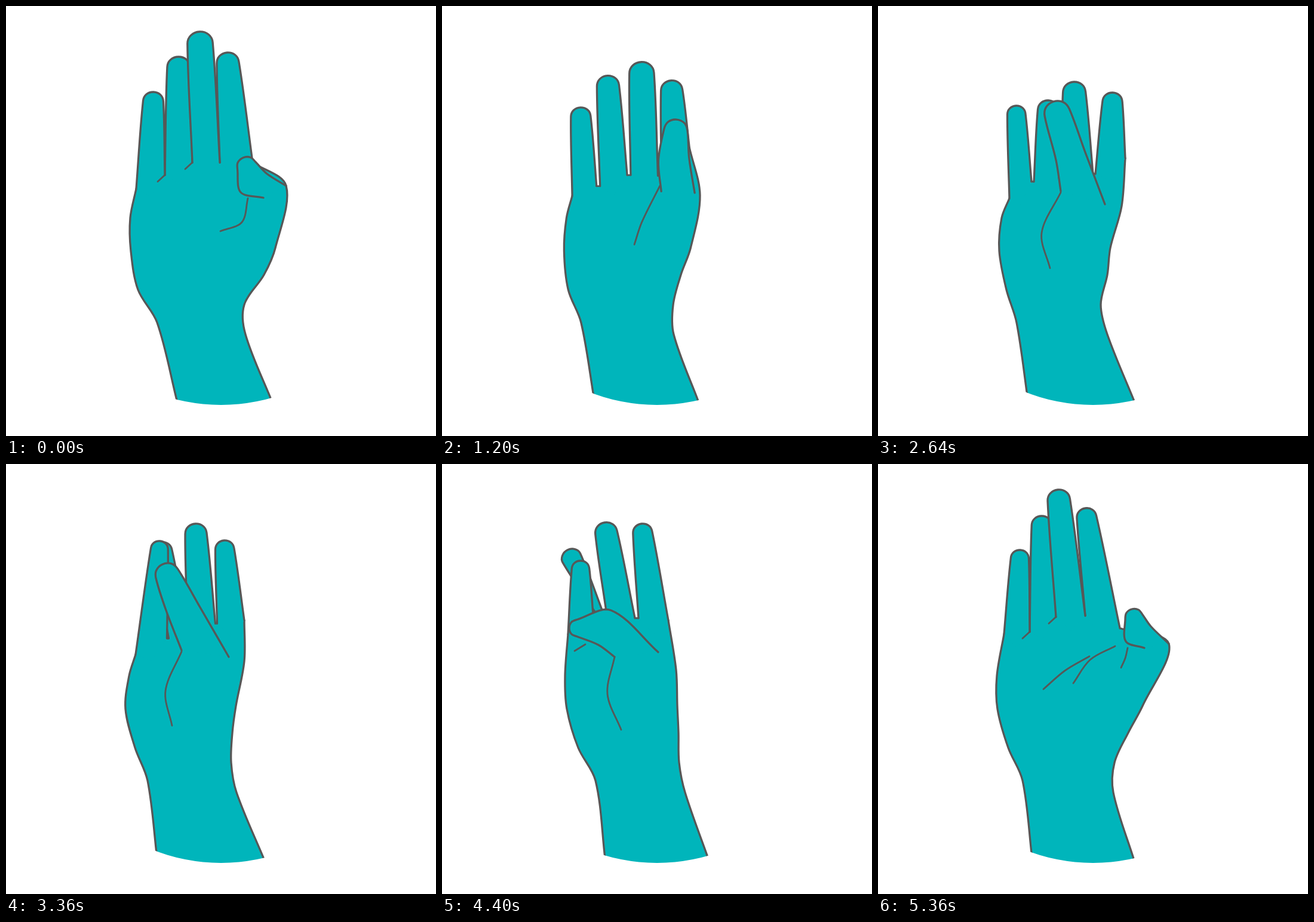
These frames come from a looping animation (720x720 px, 5.44 s). An HTML page with a canvas:

```html
<!DOCTYPE html>
<html lang="en">
<head>
<meta charset="utf-8">
<title>Thumb to finger exercise</title>
<style>
html, body { margin: 0; width: 100%; height: 100%; overflow: hidden; background: #fff; }
canvas { display: block; }
</style>
</head>
<body>
<canvas id="stage" width="720" height="720"></canvas>
<script>
const ctx = document.getElementById('stage').getContext('2d');
const LOOP = 5440, STEP = 80;
const SKIN = '#00b5bb', INK = '#575757';
const WIDTHS = [32, 36, 40, 35];          // pinky, ring, middle, index
const LEFT_Y = [660, 530, 475, 410, 355]; // heights at which the palm edges are given
const RIGHT_Y = [405, 450, 500, 550, 664];

const points = text => text.split(' ').map(p => p.split(',').map(Number));

// webs: the five points between and beside the fingers; knuckle: top of the right palm edge;
// thumb: inner base, inner joint, tip, outer joint, outer base
const pose = (at, size, gap, left, right, webs, tips, knuckle, thumbSize, thumb, crease) => ({
  at, size, gap, left, right, thumbSize, webs: points(webs), tips: points(tips),
  knuckle: points(knuckle)[0], thumb: points(thumb), crease: points(crease)
});

const POSES = [
  pose(0, 1.06, 0, [286, 253, 221, 209, 208], [451, 432, 399, 401, 446],
    '218,306 266,283 312,262 358,262 413,262', '247,144 289,85 324,43 370,78',
    '469,301', 33, '431,321 393,312 397,254 437,281 469,301', '405,322 395,362 359,377'),
  pose(640, 1.06, 2, [255, 231, 209, 203, 207], [428, 407, 388, 388, 430],
    '219,318 265,297 313,277 364,279 412,205', '240,161 290,105 332,69 381,114',
    '446,284', 30, '397,282 389,250 421,205 438,245 446,284', '397,282 378,333 344,348'),
  pose(1840, 1, 4, [255, 235, 214, 206, 210], [403, 392, 386, 388, 430],
    '217,318 258,307 313,290 365,290 417,275', '222,180 262,130 336,122 387,137',
    '416,355', 50, '333,343 332,270 360,173 386,265 397,346', '328,323 285,395 297,458'),
  pose(2640, 0.95, 2, [251, 232, 215, 203, 207], [389, 384, 373, 384, 430],
    '220,322 259,294 305,288 362,281 414,255', '231,167 285,158 328,127 393,145',
    '408,335', 43, '306,310 298,258 294,160 347,245 380,332', '306,312 274,380 288,439'),
  pose(3360, 0.9, 1.5, [253, 237, 216, 200, 206], [385, 379, 377, 386, 433],
    '217,319 271,292 302,262 352,267 399,262', '258,129 259,131 317,100 365,128',
    '399,330', 40, '294,312 268,245 262,168 325,240 373,323', '294,314 267,380 278,438'),
  pose(4400, 0.92, 3, [273, 257, 228, 209, 206], [394, 396, 397, 407, 447],
    '211,285 256,252 272,247 326,258 379,262', '232,162 210,144 272,98 334,100',
    '392,345', 28, '289,323 262,303 213,275 283,245 362,315', '289,323 277,385 300,445'),
  pose(5360, 0.94, 0, [258, 242, 218, 200, 199], [443, 419, 396, 394, 429],
    '211,285 254,281 298,256 347,254 405,275', '238,144 274,87 301,43 347,74',
    '487,301', 30, '446,308 415,297 425,243 457,272 487,301', '397,305 355,328 327,367')
];

// Short skin lines: [from, to, points]
const MARKS = [
  [4160, 4720, points('222,313 240,302')],
  [5120, LOOP, points('354,322 313,346 277,377')],
  [5120, LOOP, points('418,308 414,325 407,341')]
];

function mix(a, b, f) {
  if (typeof a === 'number') return a + (b - a) * f;
  if (Array.isArray(a)) return a.map((v, i) => mix(v, b[i], f));
  return Object.fromEntries(Object.keys(a).map(k => [k, mix(a[k], b[k], f)]));
}

function poseAt(t) {
  const next = Math.max(1, POSES.findIndex(p => p.at >= t));
  const a = POSES[next - 1], b = POSES[next];
  const f = (t - a.at) / (b.at - a.at);
  const hand = mix(a, b, f);
  // The pinky swings out as the hand opens again
  if (next === POSES.length - 1) hand.tips[0][0] -= 88 * Math.sin(Math.PI * f);
  return hand;
}

const dist = (a, b) => Math.hypot(b[0] - a[0], b[1] - a[1]);
const middle = (a, b) => mix(a, b, 0.5);

// Smooth curve through the points, with handles in proportion to each segment
function curve(path, pts) {
  const dir = pts.map((p, i) => {
    const a = pts[i - 1] || p, b = pts[i + 1] || p;
    const len = dist(a, p) + dist(p, b) || 1;
    return [(b[0] - a[0]) / len, (b[1] - a[1]) / len];
  });
  path.lineTo(...pts[0]);
  for (let i = 1; i < pts.length; i++) {
    const a = pts[i - 1], b = pts[i], h = dist(a, b) / 3;
    path.bezierCurveTo(a[0] + dir[i - 1][0] * h, a[1] + dir[i - 1][1] * h,
      b[0] - dir[i][0] * h, b[1] - dir[i][1] * h, ...b);
  }
}

function stroke(pts) {
  const path = new Path2D();
  curve(path, pts);
  ctx.stroke(path);
}

// A finger or thumb: two sides joined by a round cap at the tip
function digit(inner, tip, outer, width, root) {
  const base = middle(inner[inner.length - 1], outer[0]);
  const len = dist(base, tip), r = width / 2;
  const ux = (tip[0] - base[0]) / len, uy = (tip[1] - base[1]) / len;
  const cap = [180, 135, 90, 45, 0].map(deg => {
    const a = deg * Math.PI / 180;
    const side = r * Math.cos(a), along = 0.9 * r * (Math.sin(a) - 1);
    return [tip[0] + ux * along - uy * side, tip[1] + uy * along + ux * side];
  });
  const outline = new Path2D();
  curve(outline, [...inner, ...cap, ...outer]);
  const body = new Path2D(outline);
  if (root) body.lineTo(base[0], base[1] + root);
  ctx.fill(body);
  ctx.stroke(outline);
}

function drawFinger(hand, i) {
  const [a, b] = [hand.webs[i], hand.webs[i + 1]];
  const from = [a[0] + (i > 0 ? hand.gap : 0), a[1]];
  const to = [b[0] - (i < 3 ? hand.gap : 0), b[1]];
  digit([from], hand.tips[i], [to], WIDTHS[i] * hand.size, 25);
}

function draw(t) {
  const hand = poseAt(t);
  const { webs, thumb, gap } = hand;
  const left = [...hand.left.map((x, i) => [x, LEFT_Y[i]]), webs[0]];
  const right = [webs[4], hand.knuckle, ...hand.right.map((x, i) => [x, RIGHT_Y[i]])];

  ctx.fillStyle = '#fff';
  ctx.fillRect(0, 0, 720, 720);
  ctx.save();

  // The wrist is cut off by a large circle
  ctx.beginPath();
  ctx.rect(0, 0, 720, 500);
  ctx.moveTo(668, 360);
  ctx.arc(360, 360, 308, 0, 2 * Math.PI);
  ctx.clip();

  ctx.fillStyle = SKIN;
  ctx.strokeStyle = INK;
  ctx.lineWidth = 3.3;
  ctx.lineCap = ctx.lineJoin = 'round';

  const palm = new Path2D();
  curve(palm, left);
  webs.slice(1, 4).forEach(w => palm.lineTo(...w));
  curve(palm, right);
  palm.lineTo(right[6][0], 720);
  palm.lineTo(left[0][0], 720);
  ctx.fill(palm);
  stroke(left);
  stroke(right);

  // Back to front: ring, pinky, index, middle
  [1, 0, 3, 2].forEach(i => drawFinger(hand, i));
  ctx.lineWidth = 2.8;
  webs.slice(1, 4).forEach(([x, y]) => stroke([[x - gap, y], [x + gap, y]]));
  if (t < 480 || t > 5040) {
    webs.slice(1, 3).forEach(([x, y]) => stroke([[x, y], [x - 12, y + 11]]));
  }

  ctx.lineWidth = 3.3;
  digit(thumb.slice(0, 2), thumb[2], thumb.slice(3), hand.thumbSize);
  ctx.lineWidth = 2.8;
  stroke(hand.crease);
  for (const [from, to, pts] of MARKS) if (t >= from && t < to) stroke(pts);
  ctx.restore();
}

const start = performance.now();
function tick() {
  const t = (performance.now() - start) % LOOP;
  draw(Math.floor(t / STEP) * STEP);
  requestAnimationFrame(tick);
}
tick();
</script>
</body>
</html>
```
